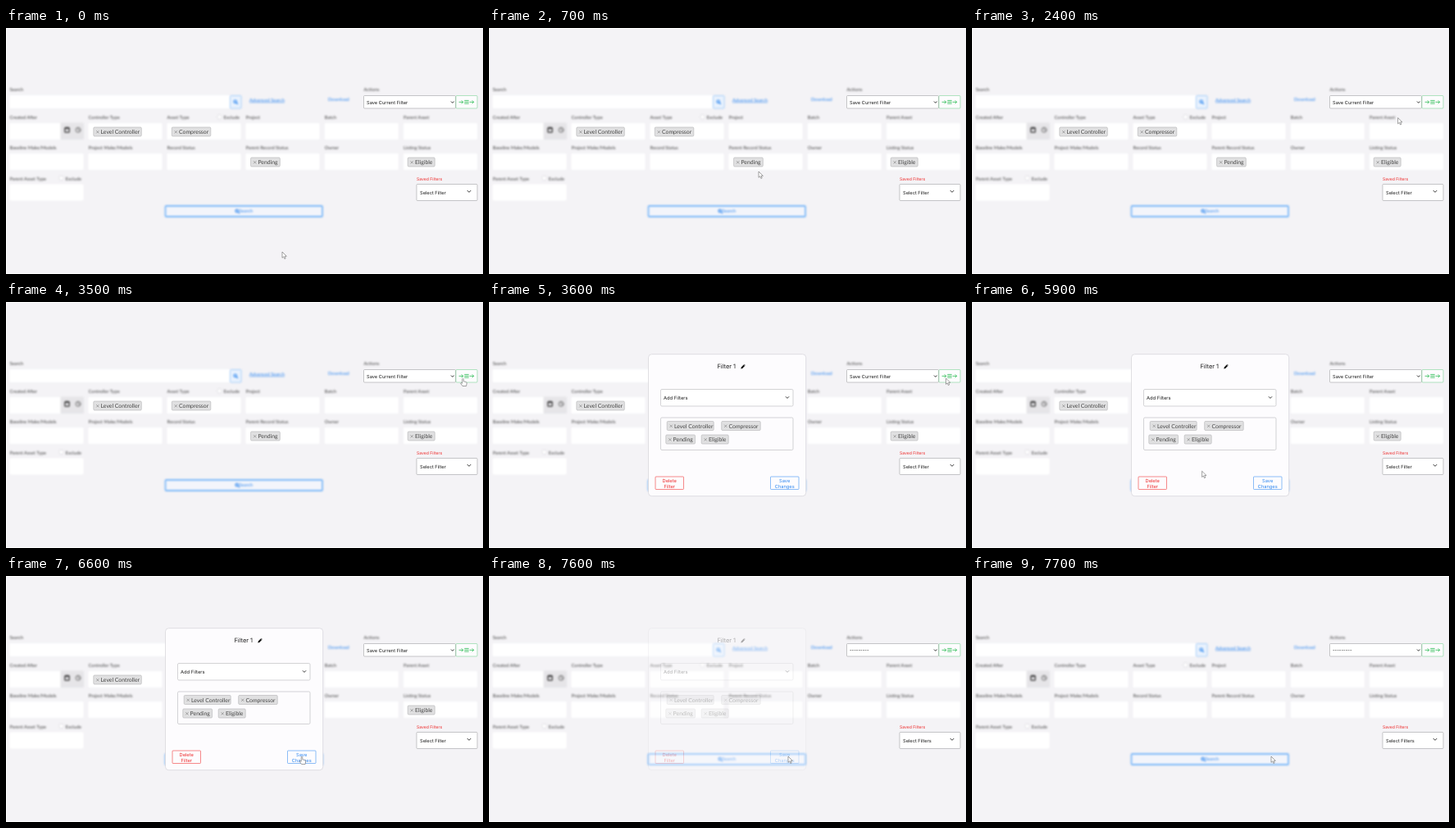
An HTML page for the animation above (8000 ms loop, 582 px wide and 300 px high).

```html
<!DOCTYPE html>
<html lang="en">
<head>
<meta charset="utf-8">
<title>Save a filter</title>
<style>
  html, body { margin: 0; width: 100%; height: 100%; overflow: hidden; background: #fff; }
  svg { display: block; width: 582px; height: 300px; }
  text { font-family: Inter, Roboto, sans-serif; font-size: 5.7px; fill: #1c1c1c; text-rendering: geometricPrecision; }
  .blur text { font-family: Lato, "Open Sans", sans-serif; fill: #444; }
  .blur .link { fill: #2f88f0; }
  .chip text { font-family: Lato, "Open Sans", sans-serif; font-size: 6.85px; fill: #444; }
  .chip rect { fill: #e0e0e1; stroke: #b4b4b6; stroke-width: .6; }
  .chip path { stroke: #666; stroke-width: .5; }
  .line { fill: none; stroke: #222; stroke-width: .9; stroke-linecap: round; stroke-linejoin: round; }
  .cursor { fill: #fff; stroke: #666; stroke-width: .6; stroke-linejoin: round; }
</style>
</head>
<body>
<svg id="stage" viewBox="0 0 582 300"></svg>
<script>
const LOOP = 8000, STEP = 100;
const BG = '#f4f3f6', PAPER = '#fdfcfe', BLUE = '#2f88f0', RED = '#ee2a2a', GREEN = '#45c568';

const rect = (x, y, w, h, fill, stroke = 'none', r = 1, sw = 1) =>
  `<rect x="${x}" y="${y}" width="${w}" height="${h}" rx="${r}" fill="${fill}" stroke="${stroke}" stroke-width="${sw}"/>`;
const text = (x, y, s, attrs = '') => `<text x="${x}" y="${y}" ${attrs}>${s}</text>`;
const link = (x, y, s, attrs = '') => text(x, y, s, 'class="link" ' + attrs);
const line = (d, attrs = '') => `<path class="line" d="${d}" ${attrs}/>`;
const group = (attrs, ...parts) => `<g ${attrs}>${parts.join('')}</g>`;
const chevron = (x, y, r) => line(`M${x - r} ${y - r / 2}l${r} ${r}l${r} ${-r}`);
const lens = (x, y) => line(`M${x + 1.2} ${y + 1.2}l1.6 1.6M${x + 1.7} ${y}a1.7 1.7 0 1 0 -3.4 0a1.7 1.7 0 1 0 3.4 0`,
  `style="stroke:${BLUE};stroke-width:1.2"`);
const chip = (x, y, w, s) => group(`class="chip" transform="translate(${x} ${y})"`,
  '<rect width="' + w + '" height="11" rx="1.2"/>',
  '<path d="M3.4 4.2l3.2 3.2m0-3.2l-3.2 3.2"/>', text(8.8, 8.2, s));
const button = (x, color, top, low) => rect(x, 213, 34.5, 15.5, PAPER, color, .8, .55) +
  [top, low].map((s, i) => text(x + 17.2, 219.8 + i * 7, s, `text-anchor="middle" style="fill:${color}"`)).join('');

const cols = [4.5, 100.5, 196.5, 292.5, 388.8, 485];
const rows = [
  [116, ['Created After', 'Controller Type', 'Asset Type', 'Project', 'Batch', 'Parent Asset']],
  [153, ['Baseline Make/Models', 'Project Make/Models', 'Record Status', 'Parent Record Status', 'Owner', 'Listing Status']],
  [190.5, ['Parent Asset Type']]
];
const fields = rows.map(([y, names]) => names.map((s, i) =>
  text(cols[i], y - 5, s) + rect(cols[i], y, 90, 20, '#fff')).join('')).join('');
const exclude = (x, y) => rect(x, y - 5, 5, 5, '#fff', '#e2e0e5') + text(x + 7.5, y, 'Exclude');

const soften = '<filter id="soften" filterUnits="userSpaceOnUse" x="0" y="0" width="582" height="300"' +
  ' color-interpolation-filters="sRGB"><feGaussianBlur stdDeviation="1"/></filter>';
const form = group('class="blur" filter="url(#soften)"',
  text(4.5, 77, 'Search'), text(436.5, 77, 'Actions'),
  rect(4.5, 82, 268.5, 16, '#fff'),
  rect(273.5, 82.5, 13.5, 15.5, '#e9f2fd', '#a8cff8'), lens(279.7, 89.7),
  link(297, 89.6, 'Advanced Search', 'text-decoration="underline"'), link(393, 89.3, 'Download'),
  fields, exclude(258, 111), exclude(65, 185.5),
  rect(66.5, 115.5, 28.5, 20.5, '#e6e5e8'),
  rect(71.8, 121.8, 5.4, 5.4, 'none', '#333', .6, 1.2), line('M72 122.6h5M73.3 120.8v1M75.7 120.8v1', 'style="stroke:#333"'),
  line('M91 124.3a3 3 0 1 0 -6 0a3 3 0 1 0 6 0M88 122.7v1.7l1.2.7', 'style="stroke:#666"'),
  rect(194.5, 217, 191.5, 13, '#f3f5fb', '#7fbaf8', 1, 1.8), lens(281.8, 223),
  link(284.5, 225.3, 'Search')
);

const arrows = `<g transform="translate(553 90.3)">` +
  line('M0 0h4.6M3 -1.7l1.7 1.7l-1.7 1.7M13 0h4.6M16 -1.7l1.7 1.7l-1.7 1.7M6.7 -1.9h4.6M6.7 0h4.6M6.7 1.9h4.6',
    `style="stroke:${GREEN}"`) + '</g>';
const actions = rect(436.5, 82.5, 112, 15.5, '#fff', '#a2a2a5', 1, .6) + chevron(544.7, 90.6, 1.5) +
  rect(549, 82.5, 26, 15.5, PAPER, '#7fd697', 1, .6) + arrows;
const saved = text(501, 186.4, 'Saved Filters', `style="fill:${RED};font-size:5.1px"`) +
  rect(501, 190.5, 74, 20, '#fff', '#a2a2a5', 1, .6) + chevron(565, 199.3, 2);

const before = group('id="before"',
  chip(106.8, 121, 58.5, 'Level Controller'), chip(202.3, 121, 47.5, 'Compressor'),
  chip(298.6, 158, 35.7, 'Pending'), chip(490.2, 158, 33, 'Eligible'),
  text(440, 92.5, 'Save Current Filter'), text(505, 202.6, 'Select Filter'));
const after = group('id="after"', text(440, 92.3, '---------'), text(505, 202.6, 'Select Filters'));

const modal = group('id="modal"',
  rect(194.5, 63.7, 192.2, 173, PAPER, '#d9d7dc', 4, .8),
  text(278.5, 81.3, 'Filter 1', 'style="font-size:7.4px"'),
  '<path d="M307.3 81.4l.5-1.9l2.9-2.9l1.4 1.4l-2.9 2.9zM311.1 76.2l.4-.4l1.4 1.4l-.4.4z" fill="#111"/>',
  rect(209.5, 106.5, 161.5, 20.5, '#fff', '#b8b8bb', 1.5, .6),
  text(213, 118.8, 'Add Filters', 'style="font-size:5.8px"'), chevron(364, 116.5, 1.8),
  rect(209.5, 141, 161.5, 39.5, PAPER, '#b8b8bb', 1.5, .6),
  chip(217.2, 145.5, 57, 'Level Controller'), chip(283.7, 145.5, 47.5, 'Compressor'),
  chip(215.8, 162, 35.7, 'Pending'), chip(259.2, 162, 33, 'Eligible'),
  button(203, RED, 'Delete', 'Filter'), button(343.5, BLUE, 'Save', 'Changes'));

const cursor = group('id="cursor" class="cursor"',
  '<path id="arrow" d="M0 0v7.3l1.7-1.5l1.2 2.7l1.3-.6l-1.2-2.6h2.4z"/>',
  '<path id="hand" d="M-.8 .8q.8-1.3 1.6 0v3l3.1.8q.9.3.8 1.3l-.6 3.6h-4.5l-2.5-3.4q.2-1.2 2.1.1z"/>');

const stage = document.getElementById('stage');
stage.innerHTML = soften + rect(1, 1, 581, 298, BG, 'none', 0) + form + actions + saved + before + after + modal + cursor;
const el = id => document.getElementById(id);

// time, x, y, easing into this point
const out = u => 1 - (1 - u) ** 2, linear = u => u, hold = () => 0;
const ease = u => u * u * (3 - 2 * u);
const path = [
  [0, 337, 273], [400, 327, 173, out], [500, 326, 175, linear], [700, 329, 175, hold],
  [1400, 329, 175, hold], [1900, 406, 159, ease], [2100, 406, 159, hold], [2700, 557.5, 93, out],
  [4200, 557.5, 93, hold], [4500, 317, 213, ease], [4700, 157, 216, out], [5000, 256, 202, ease],
  [5800, 256, 202, hold], [6600, 361, 220, out], [6700, 361, 220, hold],
  [7100, 364, 220, ease], [7300, 365, 220, hold], [LOOP, 365, 220, hold]
];

function place(t) {
  const i = path.findIndex(p => p[0] > t);
  const [t0, x0, y0] = path[i - 1], [t1, x1, y1, f] = path[i];
  const k = f((t - t0) / (t1 - t0));
  return [x0 + (x1 - x0) * k, y0 + (y1 - y0) * k];
}

const show = (id, on) => { el(id).style.display = on ? '' : 'none'; };

function draw(time) {
  const t = Math.floor(time % LOOP / STEP) * STEP;
  const [x, y] = place(t);
  const hand = (t >= 2700 && t < 3600) || (t >= 5900 && t < 7300 && x > 343);
  el('cursor').setAttribute('transform', `translate(${x.toFixed(2)} ${y.toFixed(2)})`);
  show('hand', hand);
  show('arrow', !hand);
  show('before', t < 7600);
  show('after', t >= 7600);
  show('modal', t >= 3600 && t < 7700);
  el('modal').style.opacity = t < 7500 ? 1 : t < 7600 ? .67 : .33;
}

const start = performance.now();
function tick() {
  draw(performance.now() - start);
  requestAnimationFrame(tick);
}
tick();
</script>
</body>
</html>
```
